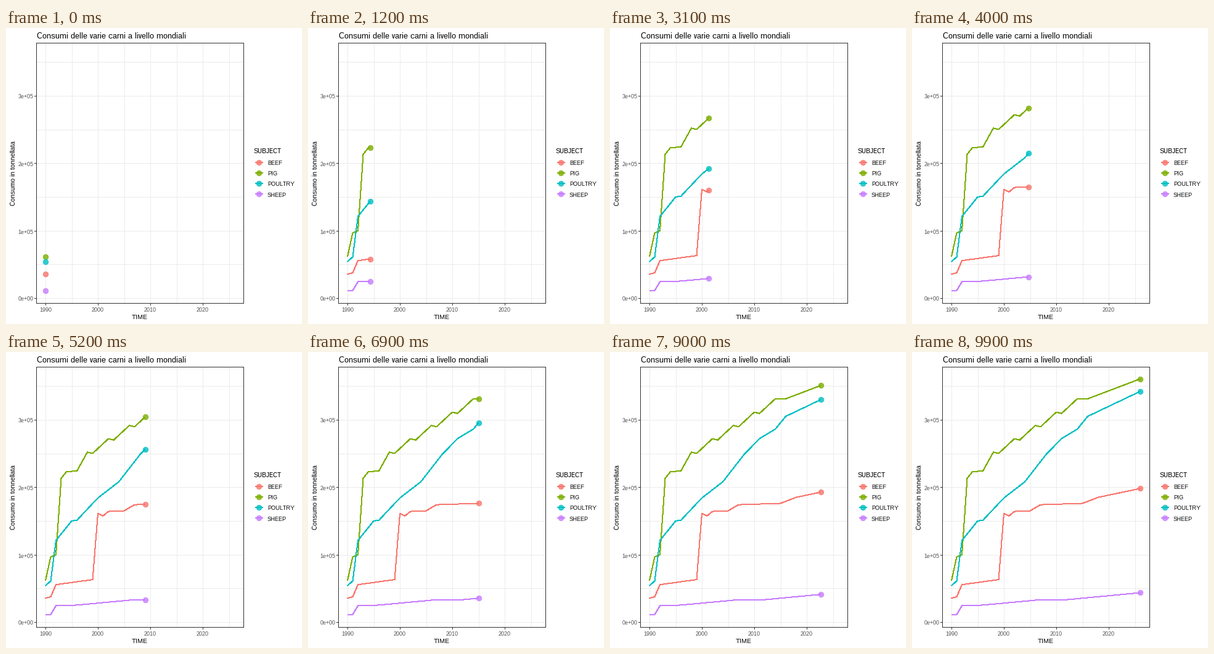
These frames come from a looping animation (480x480 px, 10000 ms). A matplotlib script:

```python
import numpy as np
import matplotlib.pyplot as plt
from matplotlib.animation import FuncAnimation

plt.rcParams.update({
    "font.family": "Liberation Sans",
    "text.hinting": "native",
    "text.hinting_factor": 1,
    "toolbar": "None",
})

SIZE, DPI = 480, 72          # at 72 dpi one point is one pixel
FRAMES, STEP = 100, 100
LEFT, RIGHT, TOP, BOTTOM = 49, 385, 24, 446
GRID, DARK, TICK_TEXT = "#ebebeb", "#333333", "#4d4d4d"

# Turning points of each trend: years since 1990, thousands of tonnes.
SERIES = {
    "BEEF": ("#f8766d", [
        (0, 35.5), (1, 37.5), (2, 55.5), (9, 63), (10, 161), (11, 157.5),
        (12, 164), (15, 165), (17, 174), (25, 176), (28, 185), (36, 198)]),
    "PIG": ("#7cae00", [
        (0, 61.5), (1, 96.5), (2, 100), (3, 213), (4, 223), (6, 224),
        (8, 252), (24, 331), (26, 331), (36, 360.5)]),
    "POULTRY": ("#00bfc4", [
        (0, 54), (1, 61), (2, 121), (5, 150), (6, 151), (10, 184), (14, 208),
        (18, 248), (21, 272), (24, 286), (26, 305), (36, 342)]),
    "SHEEP": ("#c77cff", [
        (0, 11.2), (1, 11.2), (2, 24.3), (6, 25.2), (17, 33.2), (21, 32.5),
        (36, 43.5)]),
}
YEARS = np.arange(37)
YEAR_FRAMES = np.rint(YEARS * (FRAMES - 1) / YEARS[-1])


def px(year):
    return 64 + 8.5 * year


def py(value):
    return 438 - 1.094 * value


def yearly(name, points):
    values = np.interp(YEARS, *zip(*points))
    if name == "PIG":
        # four-year cycle: a sharp drop, then a steady recovery
        cycle = (YEARS > 8) & (YEARS < 24)
        values -= np.where(cycle, 2.3 * (-YEARS % 4), 0)
    return values


fig = plt.figure(figsize=(SIZE / DPI, SIZE / DPI), dpi=DPI, facecolor="white")
ax = fig.add_axes([0, 0, 1, 1])
ax.set(xlim=(0, SIZE), ylim=(SIZE, 0))
ax.axis("off")


def rule(xs, ys, color, z=1):
    return ax.plot(xs, ys, color=color, lw=1, antialiased=False, zorder=z,
                   solid_capstyle="butt", solid_joinstyle="round")[0]


def dot(x, y, color):
    return ax.plot([x], [y], "o", color=color, ms=8.5, mew=0.9, alpha=0.8,
                   zorder=4)[0]


def label(x, y, text, size, color="black", ha="left", **kw):
    ax.text(x, y, text, fontsize=size, color=color, ha=ha, va="baseline", **kw)


# Panel grid, ticks and border
for i in range(8):
    x = int(px(5 * i) + 0.5)
    rule([x, x], [TOP, BOTTOM], GRID)
    y = int(py(50 * i) + 0.5)
    rule([LEFT, RIGHT], [y, y], GRID)
    if i % 2 == 0:
        rule([x, x], [BOTTOM, BOTTOM + 3], DARK)
        label(x, 460, str(1990 + 5 * i), 9, TICK_TEXT, "center")
        rule([LEFT - 3, LEFT], [y, y], DARK)
        label(44.5, y + 4.5, f"{i // 2}e+0{5 if i else 0}", 9, TICK_TEXT, "right")
rule([LEFT, RIGHT, RIGHT, LEFT, LEFT], [TOP, TOP, BOTTOM, BOTTOM, TOP], DARK, 5)

label(49.5, 17, "Consumi delle varie carni a livello mondiali", 13)
label(217, 472, "TIME", 9.6, ha="center")
label(15.5, 236, "Consumo in tonnellata", 11, ha="center", rotation=90,
      rotation_mode="anchor")

# Legend keys and moving series
label(402, 203, "SUBJECT", 10.5)
paths = []
for i, (name, (color, points)) in enumerate(SERIES.items()):
    y = 217.5 + 17.28 * i
    ax.fill_between([404, 417], y - 1, y + 1, color=color, lw=0, zorder=3)
    dot(410, y, color)
    label(424, int(y + 4.9), name, 9.4)
    paths.append((py(yearly(name, points)), rule([], [], color, 3),
                  dot(0, 0, color)))


def draw(frame):
    now = np.interp(frame, YEAR_FRAMES, YEARS)
    past = YEARS[YEARS < now]
    xs = px(np.append(past, now))
    artists = []
    for heights, line, head in paths:
        y = np.interp(now, YEARS, heights)
        line.set_data(xs, np.append(heights[:len(past)], y))
        head.set_data([xs[-1]], [y])
        artists += [line, head]
    return artists


anim = FuncAnimation(fig, draw, frames=FRAMES, interval=STEP, repeat=True,
                     repeat_delay=0, blit=False)
plt.show()
```
